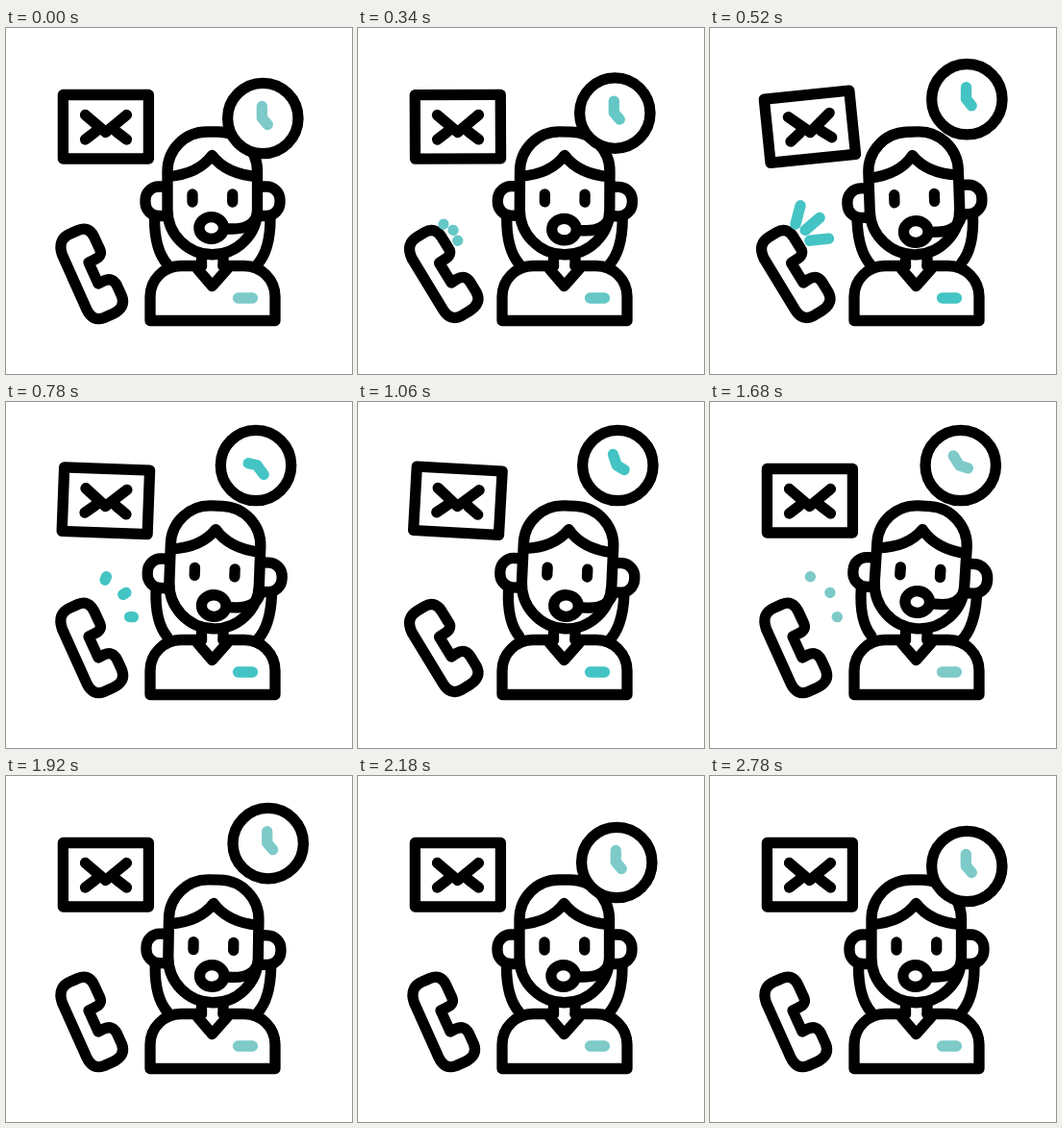
These frames come from a looping animation (360 by 360 pixels, 3.2 s). An HTML page:

```html
<!DOCTYPE html>
<html lang="en">
<head>
<meta charset="utf-8">
<title>Customer support</title>
<style>
html, body { margin: 0; width: 100%; height: 100%; overflow: hidden; background: #fff; }
svg { display: block; width: 100vw; height: 100vh; }
.ink, .teal { fill: none; stroke-width: 11.3; stroke-linecap: round; stroke-linejoin: round; }
.ink { stroke: #000; }
.white { fill: #fff; }
</style>
</head>
<body>
<svg viewBox="0 0 360 360">
  <g id="mail" class="ink">
    <rect x="59.4" y="69.5" width="89" height="66.5"/>
    <path d="M82.5 90.500 L103.700 108.500 L125.500 90.500 M82.500 116 L93 108 M125.500 116 L115 108"/>
  </g>
  <g id="phone">
    <path class="ink" d="M58.500 236 L84 293 Q90 306 102 301.500 L111 297.500 Q125 291 120.500 279 L115.500 268
      Q111 259 102 263 L96 266 L86 244 L92 241 Q101 237 97.500 230 L91.500 217 Q86 206 75 210.500 L67 214 Q53 220 58.500 236Z"/>
    <g id="rays" class="teal"></g>
  </g>
  <path id="locks" class="ink" d="M154.500 198 Q154.500 231 168 246 M275 198 Q275 231 261.500 246"/>
  <path class="ink white" d="M203.500 247.500 H182 A32 32 0 0 0 150 279.500 V304.500 H280 V279.500 A32 32 0 0 0 248 247.500 H226"/>
  <path class="ink" d="M203.500 239 V247.500 M226 239 V247.500 M199.500 251 L214.500 268.500 L230 251"/>
  <path class="teal" d="M241.500 281 H256.500"/>
  <g id="head" class="ink">
    <path class="white" d="M168 165 H159 A14 14 0 0 0 145 179 V181.500 A14 14 0 0 0 159 195.500 H168
      M261.500 165 H271 A14 14 0 0 1 285 179 V181.500 A14 14 0 0 1 271 195.500 H261.500"/>
    <path class="white" d="M168 149 A41 41 0 0 1 209 108 H220.500 A41 41 0 0 1 261.500 149
      V189 A46.750 46.750 0 0 1 168 189Z"/>
    <path d="M169 154.500 Q200 152 214.300 132.500 Q229 152 261 154.500"/>
    <path d="M194 173 V181 M235.700 173 V181"/>
    <g id="mic">
      <path d="M229 209 H236 C250 209 258 204 261 195"/>
      <ellipse class="white" cx="213.700" cy="208" rx="12.800" ry="11.300"/>
    </g>
  </g>
  <g id="clock">
    <circle class="ink" r="36.700" style="fill:#fff"/>
    <path id="hands" class="teal" d="M-1 -12.500 V-.5 L5 6.500"/>
  </g>
</svg>
<script>
const LOOP = 3200, BEAT = 810, SPIN = 650, RING = 180;
const $ = id => document.getElementById(id);
const mix = (a, b, p) => a + (b - a) * p;

// smooth step from 0 at time a to 1 at time b
function ramp(t, a, b) {
  const p = Math.min(1, Math.max(0, (t - a) / (b - a)));
  return p * p * (3 - 2 * p);
}
// fades in over a..b and out over c..d
const during = (t, a, b, c, d) => ramp(t, a, b) - ramp(t, c, d);
const wave = (t, period, peak) => Math.cos((t - peak) / period * 2 * Math.PI);

const rays = [-68, -33.5, 1].map(deg => {
  const el = document.createElementNS('http://www.w3.org/2000/svg', 'path');
  el.setAttribute('transform', `translate(88 223) rotate(${deg})`);
  return $('rays').appendChild(el);
});
const teals = document.querySelectorAll('.teal');

const spin = (id, a, x, y) => $(id).setAttribute('transform', `rotate(${a} ${x} ${y})`);
const move = (id, x, y) => $(id).setAttribute('transform', `translate(${x} ${y})`);

function drawRays(t) {
  const age = (t - 340) % 840;
  const on = t >= 340 && t < 1720 && age < 540;
  const tip = mix(20, 44.5, ramp(age, 0, 250));
  const tail = mix(20, 44.4, ramp(age, 230, 510));
  for (const ray of rays) ray.setAttribute('d', on ? `M${tail} 0 H${Math.max(tip, tail + .01)}` : '');
}

function draw(t) {
  const tilt = (1 - 3 * wave(t, BEAT, 530)) * during(t, 200, 500, 1740, 2140);
  spin('head', tilt, 214.5, 240);
  spin('locks', tilt, 214.5, 240);
  const nod = during(t, 200, 520, 1060, 1340);
  move('mic', 1.5 * nod, 4 * nod);

  spin('mail', -5.8 * wave(t, BEAT, 530) * during(t, 200, 530, 1040, 1320), 103.8, 102.5);

  const ringing = t > 250 && t < 1690;
  spin('phone', ringing ? -3.6 * (1 + wave(t, RING, 520)) : 0, 89, 256);
  drawRays(t);

  const drift = 7.5 * wave(t, BEAT, 1210) * during(t, 500, 800, 2100, 2400);
  move('clock', 267.3 + drift, 94 - 28 * during(t, 200, 700, 1800, 2300));
  const turns = ramp(t, 500, 500 + SPIN) + ramp(t, 500 + SPIN, 500 + 2 * SPIN);
  spin('hands', 360 * turns, 0, 0);

  const glow = during(t, 200, 520, 1340, 1680);
  const teal = `rgb(${mix(125, 68, glow)}, ${mix(202, 196, glow)}, ${mix(200, 196, glow)})`;
  teals.forEach(el => el.setAttribute('stroke', teal));
}

const start = performance.now();
function tick() {
  draw((performance.now() - start) % LOOP);
  requestAnimationFrame(tick);
}
tick();
</script>
</body>
</html>
```
